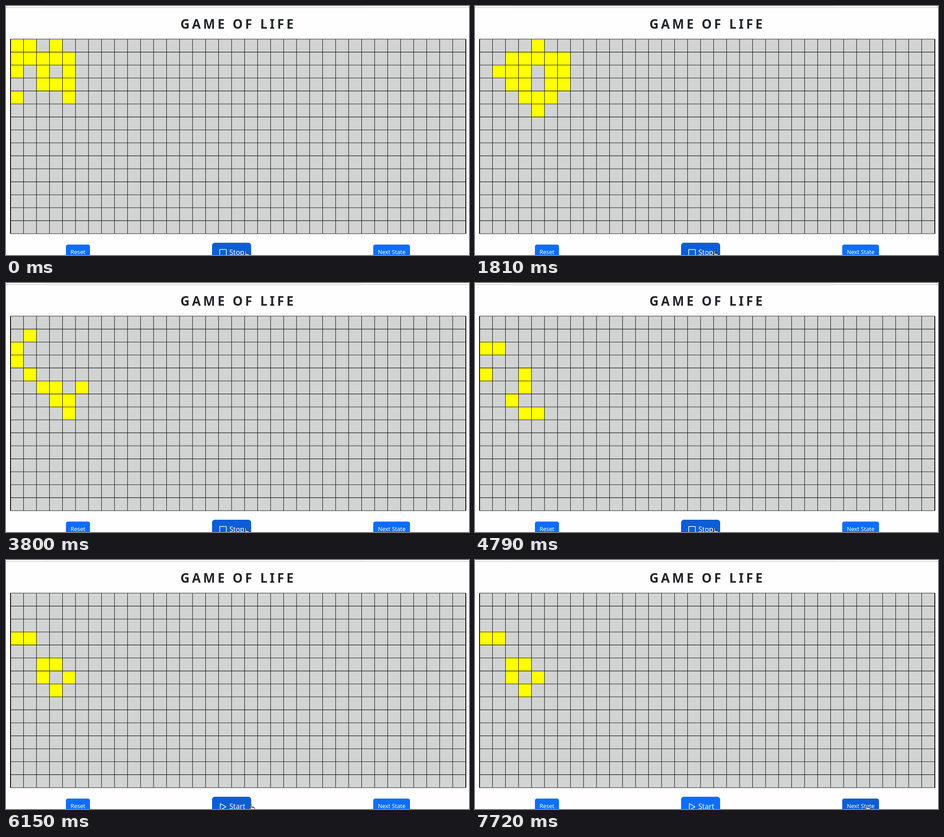
An HTML page for the animation above (8 s loop, 1020 by 549 pixels).

```html
<!DOCTYPE html>
<html lang="en">
<head>
<meta charset="utf-8">
<title>Game of Life</title>
<style>
html, body { margin: 0; width: 100%; height: 100%; overflow: hidden; background: #fefefe; }
svg { display: block; font-family: "Noto Sans", "Open Sans", sans-serif; }
.label { fill: #fff; text-anchor: middle; font-size: 12.6px; }
.icon { fill: none; stroke: #fff; stroke-width: 1.5; stroke-linejoin: round; }
#pointer path { fill: #fff; stroke: #000; stroke-width: .9; stroke-linejoin: round; }
</style>
</head>
<body>
<svg width="1020" height="549" viewBox="0 0 1020 549">
  <rect x="80" width="712" height="1" fill="#eee"/>
  <rect y="3" width="1020" height="1" fill="#bcbcbc"/>
  <text x="384.2" y="49.5" font-size="28" font-weight="700" letter-spacing="5.24" fill="#212529">GAME OF LIFE</text>

  <rect x="10" y="73" width="1003" height="429" fill="#d2d4d3"/>
  <path id="cells" fill="#ff0"/>
  <path id="lines" stroke="#1c1c1c" stroke-width="1.1" fill="none"/>
  <path id="sides" stroke="#111" stroke-width="2" d="M10 73V502M1013 73V502"/>

  <rect x="132" y="526" width="53" height="32" rx="4.5" fill="#0d6efd"/>
  <text class="label" x="158.5" y="547">Reset</text>
  <rect id="toggle" x="454.5" y="522.5" width="85" height="42" rx="5.5"/>
  <rect id="stopIcon" class="icon" x="470.7" y="536.7" width="14.8" height="14.8" rx="1"/>
  <path id="playIcon" class="icon" d="M472.2 537.2v14l12.3-7z"/>
  <text id="toggleText" x="492" y="548.5" font-size="15.6" fill="#fff"></text>
  <rect id="next" x="809.5" y="526.5" width="80" height="32" rx="4"/>
  <text class="label" x="849.7" y="547">Next State</text>

  <g id="pointer">
    <path id="arrow" d="M0 0v14l3.3-3 2.3 5 2-1-2.2-4.7h4.3z"/>
    <path id="hand" d="M0 1.3a1.2 1.2 0 0 1 2.4 0v4l5.2 1.2q1.5.4 1.5 2v3q0 2-1.5 4h-6l-4.6-6q0-1.5 1.3-1.3l1.7 1.5zM2.4 5.3v3M4.6 5.9v2.7M6.8 6.4v2.4"/>
  </g>
</svg>
<script>
const COLS = 35, ROWS = 15, LOOP = 8000;
const FIRST_TICK = 280, TICK = 498, TICKS = 11;
const CLICK = 5190, LEAVE = 6180, ENTER = 7460;
const seed = ["11010", "11111", "10101", "00111", "10001"];

// Pointer trips after the click: each one eases from the previous resting point
const start = { x: 526.5, y: 539.5 };
const trips = [
  { from: 6080, to: 6500, x: 686, y: 528 },
  { from: 6680, to: 6910, x: 909, y: 530 },
  { from: 7300, to: 7720, x: 861.5, y: 539 }
];

const el = Object.fromEntries([...document.querySelectorAll("[id]")].map(e => [e.id, e]));
const colX = c => 9.9 + 28.65 * c;
const rowY = r => 73 + 28.6 * r;
const range = n => [...Array(n).keys()];
const ramp = (t, from, to) => Math.min(1, Math.max(0, (t - from) / (to - from)));
const ease = u => u * u * (3 - 2 * u);
const show = (e, on) => e.style.display = on ? "" : "none";

function step(grid) {
  return grid.map((row, r) => row.map((alive, c) => {
    let near = -alive;
    for (let y = r - 1; y <= r + 1; y++)
      for (let x = c - 1; x <= c + 1; x++) near += grid[y]?.[x] || 0;
    return +(near === 3 || (alive && near === 2));
  }));
}

function cellPath(grid) {
  let d = "";
  grid.forEach((row, r) => row.forEach((alive, c) => {
    if (alive) d += `M${colX(c)} ${rowY(r)}H${colX(c + 1)}V${rowY(r + 1)}H${colX(c)}z`;
  }));
  return d;
}

let grid = range(ROWS).map(r => range(COLS).map(c => +(seed[r]?.[c] || 0)));
const states = [cellPath(grid)];
while (states.length <= TICKS) states.push(cellPath(grid = step(grid)));

el.lines.setAttribute("d",
  range(COLS + 1).map(c => `M${colX(c)} 73V502`).join("") +
  range(ROWS + 1).map(r => `M10 ${rowY(r)}H1013`).join(""));

// Blend from the resting blue (0) to the hovered blue (1), with a darker border
function paint(button, k) {
  const blue = n => `rgb(${13 - 2 * n},${110 - 16 * n},${253 - 38 * n})`;
  button.setAttribute("fill", blue(k));
  button.setAttribute("stroke", blue(1.6 * k));
}

function draw(t) {
  const ticks = Math.floor((t - FIRST_TICK) / TICK) + 1;
  el.cells.setAttribute("d", states[Math.min(TICKS, Math.max(0, ticks))]);
  show(el.sides, t < CLICK || t >= CLICK + 500);

  const running = t < CLICK + 70;
  el.toggleText.textContent = running ? "Stop" : "Start";
  show(el.stopIcon, running);
  show(el.playIcon, !running);
  paint(el.toggle, 1 - ramp(t, LEAVE, LEAVE + 150));
  paint(el.next, ramp(t, ENTER, ENTER + 150));

  let { x, y } = start;
  for (const trip of trips) {
    const u = ease(ramp(t, trip.from, trip.to));
    x += (trip.x - x) * u;
    y += (trip.y - y) * u;
  }
  el.pointer.setAttribute("transform", `translate(${x} ${y})`);
  const hovering = t < LEAVE || t >= ENTER;
  show(el.hand, hovering);
  show(el.arrow, !hovering);
}

function frame() {
  draw(performance.now() % LOOP);
  requestAnimationFrame(frame);
}
frame();
</script>
</body>
</html>
```
